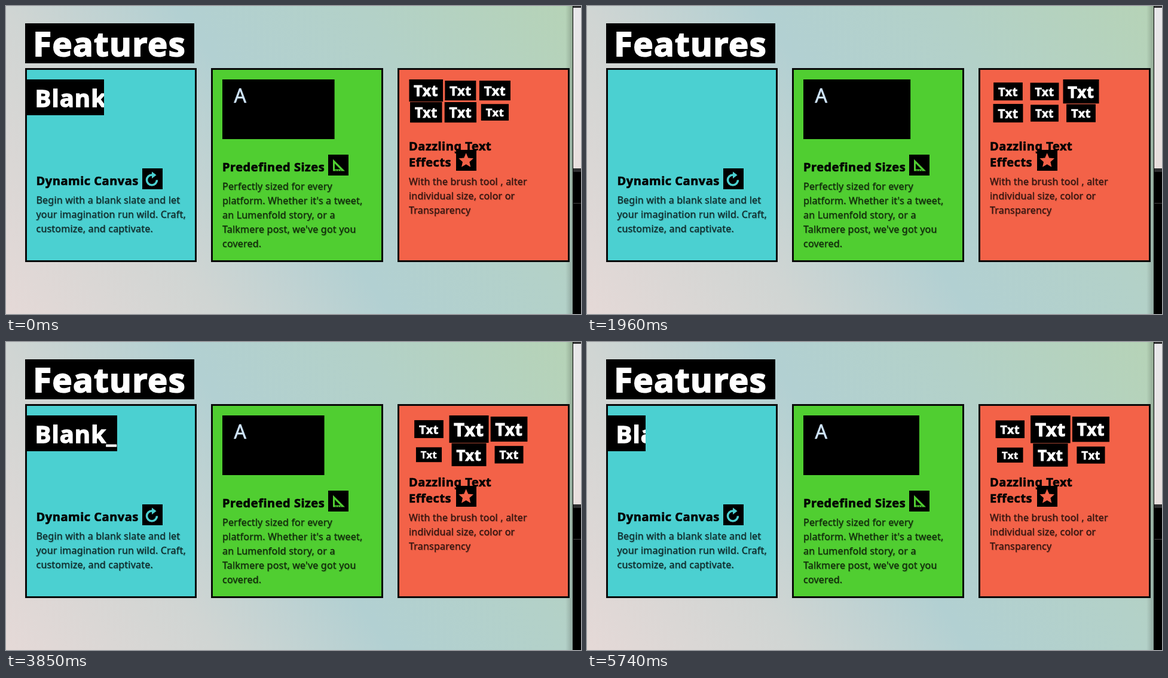
Write an HTML page that moves like this. It is 962 by 516 pixels and loops after 5810 ms.

```html
<!DOCTYPE html>
<html lang="en">
<head>
<meta charset="utf-8">
<title>Features</title>
<style>
  html, body { margin: 0; width: 100%; height: 100%; overflow: hidden; background: #b3d0cf; }
  svg { display: block; width: 962px; height: 516px; font-family: "Noto Sans", "Open Sans", sans-serif; }
  .heavy { font-weight: 700; letter-spacing: .026em; stroke-width: .036em; stroke-linejoin: miter; }
  .white { fill: #fff; stroke: #fff; }
  .title { font-size: 20px; fill: #050505; stroke: #050505; }
  .body { font-size: 16px; letter-spacing: .013em; fill: #000; stroke: #000; stroke-width: .3px;
    opacity: .8; text-shadow: 1px 1px 1px rgba(0, 0, 0, .22); }
</style>
</head>
<body>
<svg id="stage" viewBox="0 0 962 516" xmlns="http://www.w3.org/2000/svg">
  <defs>
    <linearGradient id="sky" gradientUnits="userSpaceOnUse" x1="0" y1="516" x2="888" y2="-101">
      <stop offset="0" stop-color="#e5d9d7"/>
      <stop offset=".27" stop-color="#d0d5d3"/>
      <stop offset=".49" stop-color="#b2d0d2"/>
      <stop offset=".72" stop-color="#b3d1c8"/>
      <stop offset="1" stop-color="#b6d3b6"/>
    </linearGradient>
    <linearGradient id="shade">
      <stop offset="0" stop-opacity="0"/>
      <stop offset="1" stop-opacity=".2"/>
    </linearGradient>
    <linearGradient id="panel" x2="0" y2="1">
      <stop offset="0" stop-color="#e8e7ea"/>
      <stop offset="1" stop-color="#e8dfdd"/>
    </linearGradient>
    <clipPath id="typed"><rect id="typedBox" x="35" y="123" width="0" height="60"/></clipPath>
  </defs>

  <rect width="962" height="516" fill="url(#sky)"/>
  <rect x="936" width="12" height="516" fill="url(#shade)"/>
  <rect x="948" width="14" height="516"/>
  <rect x="949" width="13" height="278" fill="#2e2e30"/>
  <rect x="949" y="3" width="13" height="269" fill="url(#panel)"/>
  <rect x="949" y="330" width="13" height="1" fill="#444"/>

  <rect x="32" y="29" width="283" height="67"/>
  <text class="heavy white" x="45.3" y="84.3" font-size="56">Features</text>

  <g id="cards" stroke="#080808" stroke-width="3"></g>
  <g id="copy"></g>

  <g clip-path="url(#typed)">
    <rect x="32" y="123" width="160" height="60"/>
    <text class="heavy white" x="48.5" y="168.5" font-size="40">Blank_</text>
  </g>

  <rect id="sizer" x="362" y="123" height="100"/>
  <text x="391.8" y="162" font-size="32" text-anchor="middle" fill="#cfe4fb" stroke="#cfe4fb" stroke-width=".7">A</text>

  <g id="words"></g>

  <rect x="228" y="272" width="34" height="35"/>
  <path d="M252.500 291.500A8.500 8.500 0 1 1 244 283" fill="none" stroke="#4bd0d1" stroke-width="3.6"/>
  <path d="M244 277.500L251.500 283.200L244 289Z" fill="#4bd0d1"/>

  <rect x="539" y="249" width="34" height="35"/>
  <path d="M547 256.500V276.500H567ZM550 264V273.500H559.500Z" fill="#50ce31" fill-rule="evenodd"/>
  <path d="M552 276.500v-2m4 2v-2m4 2v-2" stroke="#000"/>

  <rect x="753" y="241" width="34" height="35"/>
  <path id="star" fill="#f36248"/>
</svg>
<script>
const LOOP = 5810, TICK = 70;
const $ = id => document.getElementById(id);

function add(parent, tag, attrs, text = "") {
  const el = document.createElementNS("http://www.w3.org/2000/svg", tag);
  parent.append(el);
  set(el, attrs);
  el.textContent = text;
  return el;
}
function set(el, attrs) {
  for (const key in attrs) el.setAttribute(key, attrs[key]);
}

// CSS "ease", cubic-bezier(.25, .1, .25, 1), solved by bisection
function ease(x) {
  if (x <= 0) return 0;
  if (x >= 1) return 1;
  let lo = 0, hi = 1;
  for (let i = 0; i < 24; i++) {
    const s = (lo + hi) / 2;
    if (.75 * s * (1 - s) + s ** 3 < x) lo = s; else hi = s;
  }
  return .3 * lo * (1 - lo) ** 2 + 3 * lo * lo * (1 - lo) + lo ** 3;
}

const cards = [
  { x: 32, w: 287, fill: "#4bd0d1", tx: 50.5, ty: 300, title: ["Dynamic Canvas"], by: 331,
    body: ["Begin with a blank slate and let", "your imagination run wild. Craft,", "customize, and captivate."] },
  { x: 343, w: 288, fill: "#50ce31", tx: 362, ty: 277, title: ["Predefined Sizes"], by: 308,
    body: ["Perfectly sized for every", "platform. Whether it's a tweet,", "an Lumenfold story, or a", "Talkmere post, we've got you", "covered."] },
  { x: 655, w: 288, fill: "#f36248", tx: 674, ty: 242, title: ["Dazzling Text", "Effects"], by: 300,
    body: ["With the brush tool , alter", "individual size, color or", "Transparency"] }
];
for (const c of cards) {
  add($("cards"), "rect", { x: c.x + 1.5, y: 105.5, width: c.w - 3, height: 322, fill: c.fill });
  c.title.forEach((s, i) => add($("copy"), "text", { class: "heavy title", x: c.tx, y: c.ty + 27 * i }, s));
  c.body.forEach((s, i) => add($("copy"), "text", { class: "body", x: c.tx, y: c.by + 24 * i }, s));
}

$("star").setAttribute("d", "M" + Array.from({ length: 10 }, (_, i) => {
  const r = i % 2 ? 6 : 13, a = Math.PI * (i / 5 - .5);
  return (769.7 + r * Math.cos(a)).toFixed(2) + " " + (259.3 + r * Math.sin(a)).toFixed(2);
}).join("L") + "Z");

// Font sizes each word eases through, a new one every 3150 ms
const sizes = [
  [32.8, 20, 20, 18],
  [26.2, 19.5, 31.3, 27],
  [14, 26.9, 28, 30],
  [26.6, 20.7, 16.3, 22],
  [29.5, 18.8, 26.1, 22.6],
  [15.8, 20.1, 19.5, 14]
];
const words = sizes.map(() => ({
  box: add($("words"), "rect", {}),
  label: add($("words"), "text", { class: "heavy white", "text-anchor": "middle" }, "Txt")
}));

function drawTyping(t) {
  const p = (t - 1925 + 3150) % 3150 / 3150;
  const k = p < .4 ? Math.floor(7 * p / .4)
    : p < .6 ? 7
    : 7 - Math.floor(7 * (p - .6) / .4);
  $("typedBox").setAttribute("width", Math.max(0, 22 * k - 3));
}

// Narrowest at 2980 ms, widest half a cycle away
function drawSizer(t) {
  const half = 2100, p = Math.abs((t - 2980 + 3 * half) % (2 * half) - half) / half;
  $("sizer").setAttribute("width", 100 + 100.5 * ease(p));
}

function drawWords(t) {
  const since = t + 760, n = Math.floor(since / 3150);
  const k = ease((since - 3150 * n) / 2100);
  const fs = sizes.map(s => s[n] + (s[n + 1] - s[n]) * k);
  const width = f => 16 + 1.636 * f;
  const col = width(Math.max(...fs)) + 1;
  const rows = [1.5 * Math.max(...fs.slice(0, 3)), 1.5 * Math.max(...fs.slice(3))];
  const mid = [123 + rows[0] / 2, 123.7 + rows[0] + rows[1] / 2];
  words.forEach(({ box, label }, i) => {
    const f = fs[i], w = width(f), h = 1.5 * f;
    const x = 674 + col * (i % 3 + .5), y = mid[i < 3 ? 0 : 1];
    set(box, { x: x - w / 2, y: y - h / 2, width: w, height: h });
    set(label, { x, y: y + .388 * f, "font-size": f });
  });
}

function draw(ms) {
  const t = Math.floor(ms % LOOP / TICK) * TICK;
  drawTyping(t);
  drawSizer(t);
  drawWords(t);
}

const start = performance.now();
function frame() {
  draw(performance.now() - start);
  requestAnimationFrame(frame);
}
frame();
</script>
</body>
</html>
```
